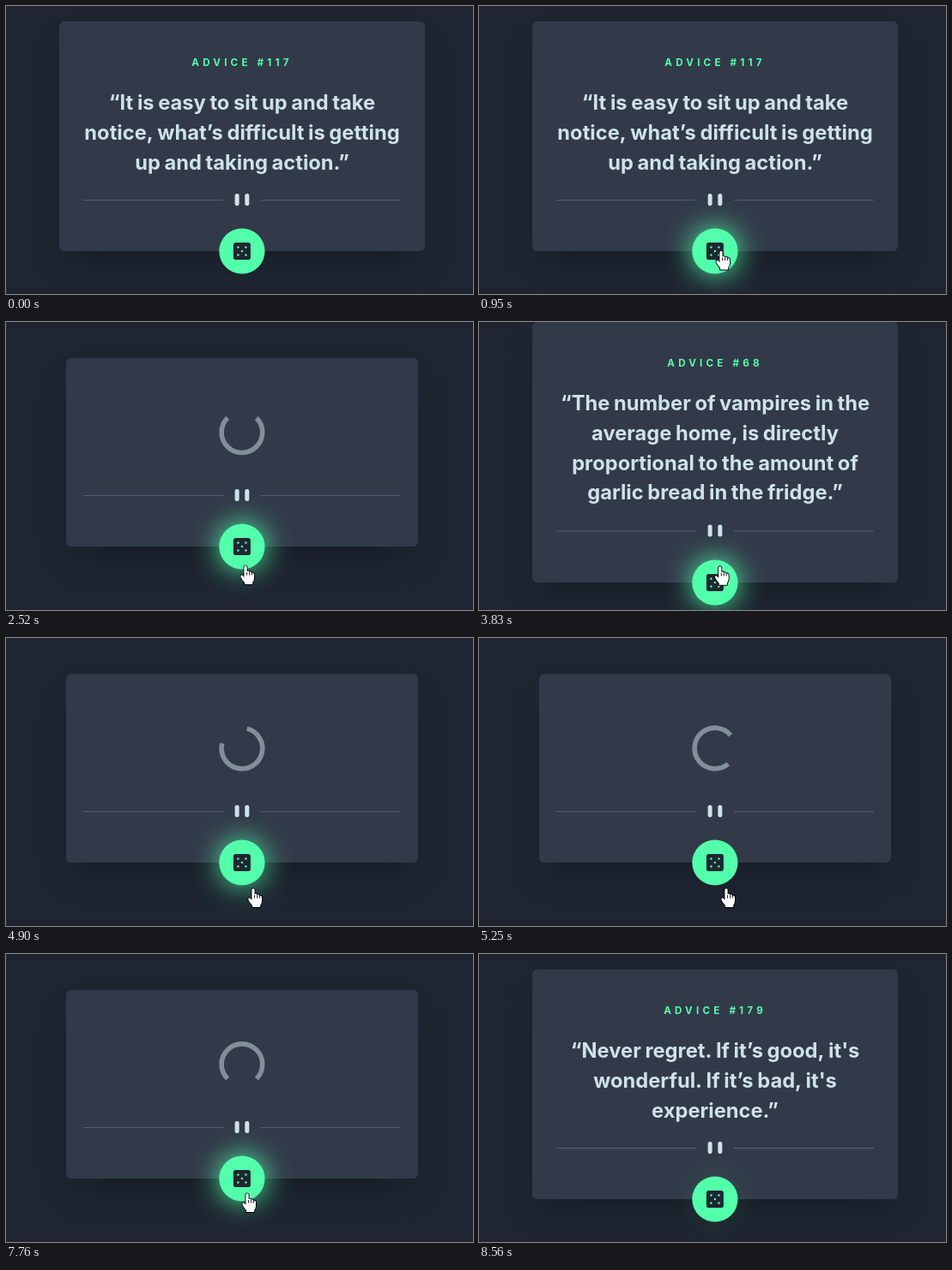
These frames come from a looping animation (544 px wide and 336 px high, 9.35 s). An HTML page with a canvas:

```html
<!DOCTYPE html>
<html lang="en">
<head>
<meta charset="utf-8">
<title>Advice generator</title>
<style>
  html, body { margin: 0; width: 100%; height: 100%; overflow: hidden; background: #1f2632; }
  canvas { display: block; width: 544px; height: 336px; }
</style>
</head>
<body>
<canvas id="stage" width="544" height="336"></canvas>
<script>
const ctx = document.getElementById('stage').getContext('2d');
const LOOP = 9350, TICK = 70;
const CX = 274.9, CY = 152;
const COLORS = { page: '#1f2632', card: '#323a49', text: '#cee3e9', line: '#4f5d74', neon: '#53ffab' };

const advices = [
  { id: 117, lines: ['“It is easy to sit up and take', 'notice, what’s difficult is getting', 'up and taking action.”'] },
  { id: 68, lines: ['“The number of vampires in the', 'average home, is directly', 'proportional to the amount of', 'garlic bread in the fridge.”'] },
  { id: 75, lines: ['“You will always regret the round', 'of Tequila.”'] },
  { id: 179, lines: ['“Never regret. If it’s good, it\'s', 'wonderful. If it’s bad, it\'s', 'experience.”'] }
];

// Loading periods; gap is the spinner's opening angle at the start.
const loads = [
  { from: 1410, to: 2580, gap: -133 },
  { from: 4900, to: 5320, gap: -121 },
  { from: 7130, to: 7810, gap: -137 }
];

// Pointer stops: time, x, y of the tip.
const path = [
  [530, 357, 312], [600, 338, 307], [740, 302, 296], [880, 285, 287], [1020, 279, 284],
  [3760, 279, 284], [3830, 281, 285], [4110, 288, 292],
  [6380, 288, 292], [6450, 288, 288], [6800, 281, 279],
  [8280, 281, 279], [8350, 304, 292], [8420, 354, 308], [8490, 423, 325]
];

// Glow stops: time, strength.
const glowStops = [
  [0, 0], [690, 0], [900, 1], [4850, 1], [5070, 0], [5320, 0], [5530, 1], [8300, 1], [8540, 0], [LOOP, 0]
];

function sample(stops, t) {
  if (t <= stops[0][0]) return stops[0].slice(1);
  const i = stops.findIndex(s => s[0] > t);
  if (i < 0) return stops[stops.length - 1].slice(1);
  const a = stops[i - 1], b = stops[i];
  const k = (t - a[0]) / (b[0] - a[0]);
  return a.slice(1).map((v, j) => v + (b[j + 1] - v) * k);
}

function roundRect(x, y, w, h, r, color) {
  ctx.fillStyle = color;
  ctx.beginPath();
  ctx.roundRect(x, y, w, h, r);
  ctx.fill();
}

function disc(x, y, r, color) {
  ctx.fillStyle = color;
  ctx.beginPath();
  ctx.arc(x, y, r, 0, Math.PI * 2);
  ctx.fill();
}

// Paints only the blurred shadow of a shape by drawing the shape off stage.
function shadowOnly(color, blur, dy, draw) {
  ctx.save();
  ctx.shadowColor = color;
  ctx.shadowBlur = blur;
  ctx.shadowOffsetX = 2000;
  ctx.shadowOffsetY = dy;
  ctx.translate(-2000, 0);
  draw();
  ctx.restore();
}

function drawCard(width, top, bottom) {
  const x = 275 - width / 2, height = bottom - top;
  shadowOnly('rgba(0,0,0,0.25)', 42, 21, () => roundRect(x + 10, top + 10, width - 20, height - 20, 5, '#000'));
  roundRect(x, top, width, height, 6, COLORS.card);
}

function centered(text, y, font, letterGap, wordGap, color) {
  ctx.font = font;
  ctx.letterSpacing = letterGap + 'px';
  ctx.wordSpacing = wordGap + 'px';
  ctx.fillStyle = color;
  ctx.textAlign = 'center';
  ctx.fillText(text, 275, y);
}

function drawAdvice({ id, lines }, top) {
  centered('ADVICE #' + id, top + 52, '700 11.6px Inter, sans-serif', 4.2, 0, COLORS.neon);
  lines.forEach((line, i) =>
    centered(line, Math.round(top + 103 + i * 34.8), '700 23.7px Inter, sans-serif', 0, -1, COLORS.text));
}

function drawSpinner(gap) {
  const rad = Math.PI / 180;
  ctx.strokeStyle = 'rgba(206,227,233,0.5)';
  ctx.lineWidth = 5.6;
  ctx.beginPath();
  ctx.arc(CX, 128.7, 23.8, (gap + 45) * rad, (gap + 315) * rad);
  ctx.stroke();
}

function drawDivider(y) {
  ctx.fillStyle = COLORS.line;
  ctx.fillRect(90, y, 163.5, 1);
  ctx.fillRect(297, y, 163, 1);
  for (const x of [266.6, 278.3]) roundRect(x, y - 7, 5, 14, 2.2, COLORS.text);
}

function drawButton(y, glow) {
  if (glow > 0) shadowOnly(`rgba(83,255,171,${glow})`, 33, 0, () => disc(CX, y, 26.6, '#000'));
  disc(CX, y, 26.6, COLORS.neon);
  roundRect(CX - 10, y - 10, 20, 20, 2.8, COLORS.page);
  for (const [dx, dy] of [[0, 0], [-1, -1], [1, -1], [-1, 1], [1, 1]])
    disc(CX + dx * 4.5, y + dy * 4.5, 1.2, COLORS.neon);
}

const hand = new Path2D('M-1.6 1.6Q0 -1 1.6 1.6V7Q3.6 5.8 4.6 7.8Q6.6 6.6 7.6 8.8Q10 8 10 11V15Q9.8 18 8.2 19.6V22H-1V20Q-4 17-5.6 13.5Q-6 10.4-3.6 11.6L-1.6 13.8Z');
const arrow = new Path2D('M0 0V16L3.7 12.5L6.2 18.2L8.8 17.1L6.3 11.5H11.4Z');

function drawPointer(x, y, isHand) {
  ctx.save();
  ctx.translate(x, y);
  ctx.lineJoin = 'round';
  ctx.lineWidth = 1.8;
  ctx.strokeStyle = '#000';
  ctx.fillStyle = '#fff';
  const shape = isHand ? hand : arrow;
  ctx.stroke(shape);
  ctx.fill(shape);
  if (isHand) {
    ctx.lineWidth = 0.9;
    ctx.beginPath();
    for (const lx of [1.6, 4.6, 7.4]) {
      ctx.moveTo(lx, 8);
      ctx.lineTo(lx, 11.5);
    }
    ctx.stroke();
  }
  ctx.restore();
}

function render(t) {
  const load = loads.find(l => t >= l.from && t < l.to);
  const advice = advices[loads.filter(l => t >= l.to).length];
  const height = load ? 220 : 163 + advice.lines.length * 35;
  const top = Math.floor(CY - height / 2), bottom = Math.ceil(CY + height / 2);
  const step = Math.floor(t / TICK + 0.43) * TICK - 30;

  ctx.fillStyle = COLORS.page;
  ctx.fillRect(0, 0, 544, 336);
  drawCard(load ? 410 : 426, top, bottom);
  if (load) drawSpinner(load.gap + Math.floor((t - load.from + 10) / TICK) * TICK * 0.36);
  else drawAdvice(advice, top);
  drawDivider(CY + height / 2 - 60);
  drawButton(bottom, sample(glowStops, step)[0]);

  if (t >= 530 && t < 8560) {
    const [x, y] = sample(path, step);
    drawPointer(x, y, t >= 740 && t < 8350);
  }
}

const start = performance.now();
function frame(now) {
  render(Math.max(0, now - start) % LOOP);
  requestAnimationFrame(frame);
}
render(0);
requestAnimationFrame(frame);
</script>
</body>
</html>
```
